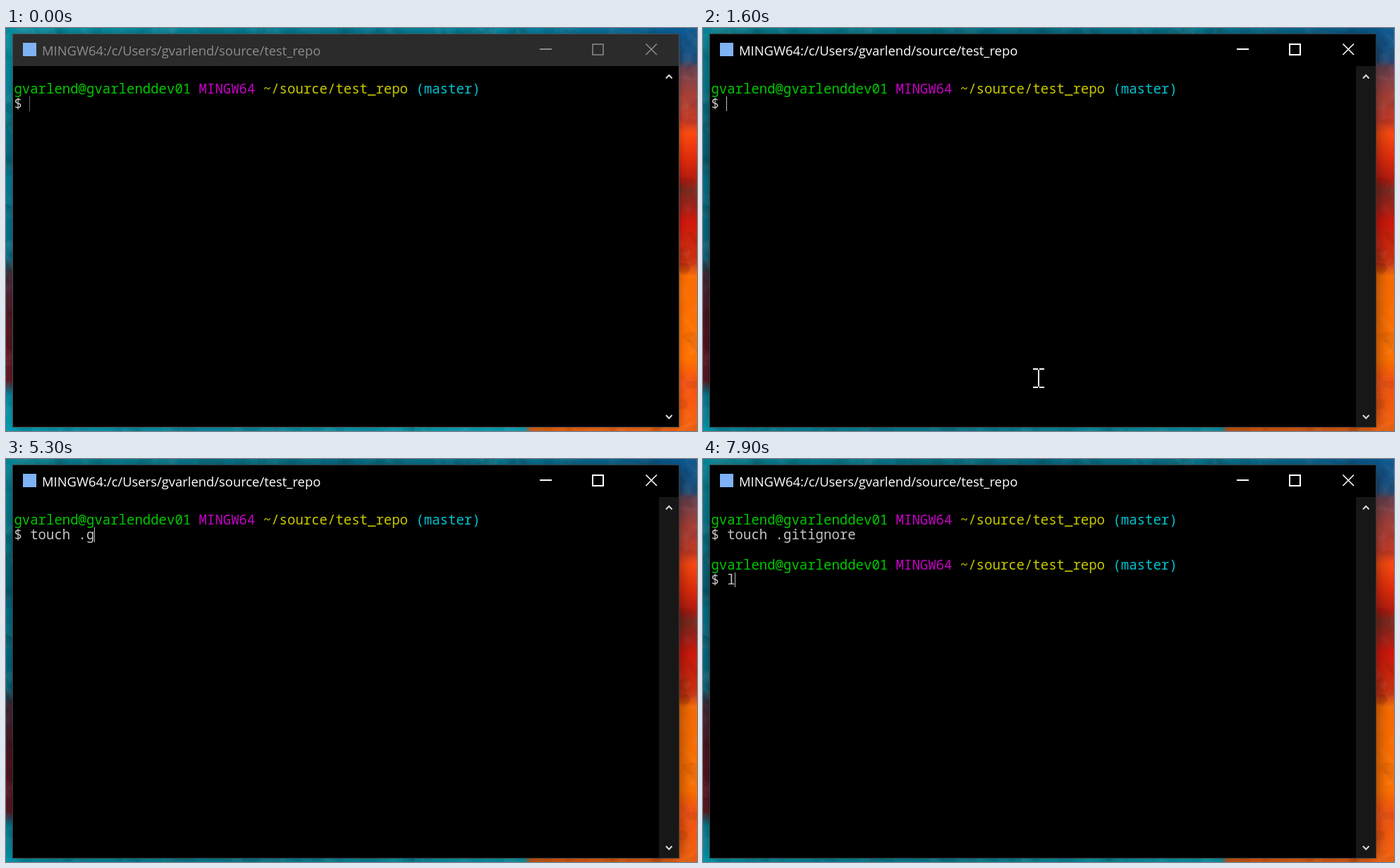
These frames come from a looping animation (980x572 px, 8 s). An HTML page with a canvas:

```html
<!DOCTYPE html>
<html lang="en">
<head>
<meta charset="utf-8">
<title>Terminal</title>
<style>
html, body { margin: 0; width: 980px; height: 572px; overflow: hidden; background: #000; }
canvas { display: block; }
</style>
</head>
<body>
<canvas id="stage" width="980" height="572"></canvas>
<script>
const W = 980, H = 572, LOOP = 8000;
const ctx = document.getElementById('stage').getContext('2d');

const USER = 'gvarlend';
const TITLE = `MINGW64:/c/Users/${USER}/source/test_repo`;
const PROMPT = [
  [`${USER}@${USER}dev01 `, '#00c800'],
  ['MINGW64 ', '#c800c8'],
  ['~/source/test_repo ', '#c8c800'],
  ['(master)', '#00c4d0']
];
const CELL = 11.4, LEFT = 11.4, BASE = 92.6, ROW = 21.33;
const COMMAND = 'touch .gitignore';
// time at which each character of the command appears
const KEYS = [3400, 3500, 3700, 3800, 4000, 4200, 4800, 5300,
  5500, 5600, 5700, 5800, 6000, 6200, 6300, 6300];

function rect(c, x, y, w, h, color) {
  c.fillStyle = color;
  c.fillRect(x, y, w, h);
}

function line(color, width, ...pts) {
  ctx.strokeStyle = color;
  ctx.lineWidth = width;
  ctx.beginPath();
  pts.forEach(([x, y], i) => i ? ctx.lineTo(x, y) : ctx.moveTo(x, y));
  ctx.stroke();
}

function rng(seed) {
  return () => (seed = (seed * 16807) % 2147483647) / 2147483647;
}

// One painted edge of the wallpaper: a gradient with a few broad, faint strokes.
function paintEdge(c, x, y, w, h, stops, rand) {
  const tall = h > w, len = tall ? h : w;
  const g = c.createLinearGradient(x, y, tall ? x : x + w, tall ? y + h : y);
  stops.forEach(([pos, color]) => g.addColorStop(pos / len, color));
  c.save();
  c.beginPath();
  c.rect(x, y, w, h);
  c.clip();
  rect(c, x, y, w, h, g);
  for (let i = 0; i < len / 14; i++) {
    c.fillStyle = rand() < 0.5 ? 'rgba(0,0,0,.06)' : 'rgba(255,255,255,.03)';
    c.beginPath();
    c.ellipse(x + rand() * w, y + rand() * h, 6 + rand() * 14, 3 + rand() * 6,
      rand() * 3, 0, Math.PI * 2);
    c.fill();
  }
  c.restore();
}

function makeWallpaper() {
  const cv = document.createElement('canvas');
  cv.width = W;
  cv.height = H;
  const c = cv.getContext('2d'), rand = rng(71);
  paintEdge(c, 0, 0, W, 10, [[0, '#078fa2'], [250, '#07859a'], [480, '#077a94'],
    [700, '#0787a2'], [850, '#0a6f9c'], [980, '#0b5c98']], rand);
  paintEdge(c, 0, 564, W, 8, [[0, '#02a0b6'], [330, '#078ba2'], [560, '#06a0b4'],
    [735, '#08a4b8'], [745, '#f0640f'], [980, '#f86510']], rand);
  paintEdge(c, 0, 0, 11, H, [[0, '#0794a6'], [80, '#07859a'], [195, '#06657c'],
    [215, '#067c96'], [325, '#066d86'], [350, '#452a3a'], [430, '#5c1822'],
    [500, '#641622'], [520, '#04869c'], [572, '#02a0b6']], rand);
  paintEdge(c, 952, 0, 28, H, [[0, '#0b5c98'], [46, '#21507e'], [56, '#6c4452'],
    [95, '#a84038'], [130, '#c43a28'], [150, '#fa4a10'], [185, '#e02c0c'],
    [215, '#b41c10'], [230, '#782a20'], [250, '#98241a'], [275, '#d0180c'],
    [335, '#c83410'], [352, '#fa6c00'], [470, '#ff7200'], [500, '#f65210'],
    [572, '#f86510']], rand);
  return cv;
}
const wallpaper = makeWallpaper();

function drawWindow(active) {
  ctx.drawImage(wallpaper, 0, 0);
  ctx.save();
  ctx.shadowColor = active ? 'rgba(0,0,0,.5)' : 'rgba(0,0,0,.3)';
  ctx.shadowBlur = active ? 22 : 10;
  rect(ctx, 9, 8, 946, 559, active ? '#383838' : '#4a4f50');
  ctx.restore();
  rect(ctx, 10, 9, 944, 557, '#000');
  if (active) rect(ctx, 926, 54, 28, 512, '#171717');
  else rect(ctx, 10, 9, 944, 45, '#2b2b2b');

  rect(ctx, 24, 21, 19, 19, '#7fb2f5');
  const ink = active ? '#fff' : '#8c8c8c';
  ctx.font = '18.4px "Open Sans", "Noto Sans", sans-serif';
  ctx.fillStyle = ink;
  ctx.fillText(TITLE, 51, 38.5);

  line(ink, 2, [757, 30], [774, 30]);
  ctx.lineWidth = active ? 2 : 1.5;
  ctx.strokeRect(832, 23, 15, 15);
  line(ink, 1.6, [907.5, 22.5], [923, 38]);
  line(ink, 1.6, [923, 22.5], [907.5, 38]);
  line('#d8d8d8', 2, [936, 71.5], [940.3, 67], [944.6, 71.5]);
  line('#d8d8d8', 2, [936, 549.5], [940.3, 554], [944.6, 549.5]);
}

function write(text, col, row, color) {
  ctx.font = '19px "Noto Sans Mono", "DejaVu Sans Mono", monospace';
  ctx.fillStyle = color;
  ctx.fillText(text, LEFT + col * CELL, Math.round(BASE + row * ROW));
}

function drawPrompt(row) {
  let col = 0;
  for (const [text, color] of PROMPT) {
    write(text, col, row, color);
    col += text.length;
  }
  write('$', 0, row + 1, '#c4c4c4');
}

function drawCaret(col, row, active) {
  const x = Math.floor(LEFT - 0.4 + col * CELL), y = Math.round(76 + row * ROW);
  if (active) rect(ctx, x, y, 1, 21, '#bfbfbf');
  else for (let i = 0; i < 21; i += 2) rect(ctx, x, y + i, 1, 1, '#bfbfbf');
}

function caretOn(t) {
  if (t < 3400) return t < 1100 || (t >= 1600 && t < 2100) || (t >= 2700 && t < 3200);
  return t < 7500 || t >= 7900;
}

function drawText(t, active) {
  const typed = COMMAND.slice(0, KEYS.filter(k => k <= t).length);
  drawPrompt(0);
  write(typed, 2, 1, '#c4c4c4');
  let col = 2 + typed.length, row = 1;
  if (t >= 6900) [col, row] = [0, 2];
  if (t >= 7000) {
    drawPrompt(3);
    [col, row] = [2, 4];
    if (t >= 7900) {
      write('l', 2, 4, '#c4c4c4');
      col = 3;
    }
  }
  if (caretOn(t)) drawCaret(col, row, active);
}

function glide(t, start, end, a, b) {
  const p = Math.min(1, Math.max(0, (t - start) / (end - start)));
  const e = p * p * (3 - 2 * p);
  return a.map((v, i) => Math.round(v + (b[i] - v) * e));
}

function drawPointer(t) {
  if (t < 200 || t >= 3400) return;
  const click = [217, 179];
  const [x, y] = t < 700
    ? glide(t, 100, 500, [270, 540], click)
    : glide(t, 700, 1100, click, [476, 497]);
  rect(ctx, x - 1, y - 12, 2, 24, '#fff');
  for (const top of [y - 14, y + 12]) {
    rect(ctx, x - 8, top, 7, 2, '#fff');
    rect(ctx, x + 1, top, 7, 2, '#fff');
  }
}

function draw(now) {
  const t = Math.floor((now % LOOP) / 100) * 100; // the screen updates ten times a second
  const active = t >= 600;
  drawWindow(active);
  drawText(t, active);
  drawPointer(t);
}

const began = performance.now();
function tick() {
  draw(performance.now() - began);
  requestAnimationFrame(tick);
}
tick();
</script>
</body>
</html>
```
